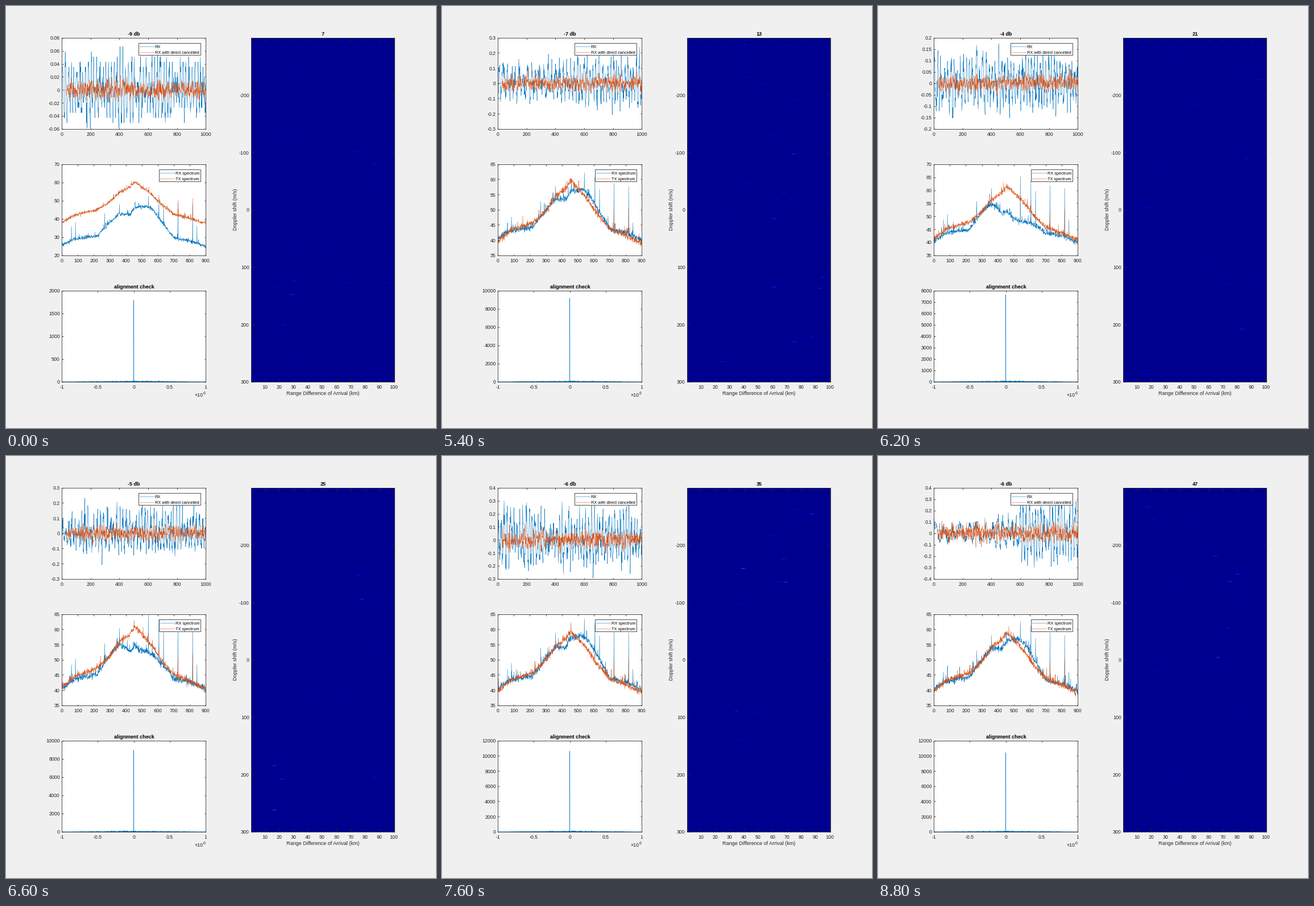
These frames come from a looping animation (756 px wide and 741 px high, 9 s). A matplotlib script:

```python
import numpy as np
import matplotlib.pyplot as plt
from matplotlib.animation import FuncAnimation
from matplotlib.colors import LinearSegmentedColormap
from matplotlib.patches import Rectangle

W, H = 756, 741
DPI = 72  # one point equals one pixel
BLUE, ORANGE, INK = "#0072BD", "#D95319", "#262626"
LINE, FRAME = 0.5, 0.8
HOLD, STEPS, INTERVAL = 25, 20, 200

plt.rcParams.update({
    "font.family": "Liberation Sans", "font.size": 8.7,
    "axes.edgecolor": INK, "axes.linewidth": FRAME,
    "xtick.color": INK, "ytick.color": INK, "text.color": INK,
    "axes.unicode_minus": False,
})

# Key points over the run; everything between them is linear
STEP = [7, 9, 13, 21, 31, 39, 47]
KEYS = {
    "db": [-9, -9, -7, -4, -6, -6, -6],
    "peak": [1790, 4500, 9180, 7650, 10900, 10350, 10430],
    "swing": [.067, .075, .235, .175, .32, .345, .345],
    "attack": [1, 1, .7, .9, .9, 1, .35],
    "rx_floor": [24.8, 29.5, 40, 39.8, 40.5, 39.5, 39.7],
    "rx_crest": [47, 52.7, 56.7, 59.7, 58.8, 57, 57],
    "tx_floor": [37.5, 38, 39, 41, 39.5, 39, 39.2],
    "tx_crest": [60.2, 59.8, 59.5, 61.5, 60, 58.5, 59],
    "dip": [0, 0, 0, 11, 0, 0, 0],
}

# Band shape from floor (0) to crest (1), and tones in dB relative to the crest
BINS = [0, 80, 220, 300, 360, 425, 455, 530, 570, 620, 700, 820, 900]
RX_SHAPE = [.03, .19, .26, .6, .81, .79, .96, 1, .9, .64, .22, .12, 0]
TX_SHAPE = [.02, .2, .33, .52, .75, .88, 1, .8, .67, .47, .23, .1, 0]
RX_TONES = {60: -11, 85: -9, 268: -4, 360: 1, 541: 5.5, 607: 4, 636: 0, 726: 2, 818: 1, 845: -11}
TX_TONES = {268: -12, 607: -7, 726: -10, 818: -9}


def at(name, n):
    return np.interp(n, STEP, KEYS[name])


def nice(lo, hi):
    """Round limits outwards to the finest 1-2-5 step with at most eight intervals."""
    decade = 10.0 ** np.floor(np.log10(hi - lo))
    for step in decade * np.array([.1, .2, .5, 1, 2]):
        a, b = np.floor(lo / step), np.ceil(hi / step)
        if b - a <= 8:
            break
    return np.round(np.arange(a, b + 1) * step, 4) + 0.0


def smooth(x, k):
    return np.convolve(x, np.ones(k) / np.sqrt(k), "same")


def waves(n, rng):
    t = np.arange(1000)
    swing, attack = at("swing", n), at("attack", n)
    env = np.interp(t, [0, 350, 700], [attack, attack, 1])
    phase = np.cumsum(2 * np.pi * env / 20)
    knots = np.arange(0, 1001, 25)
    fade = np.interp(t, knots, rng.uniform(.3, 1, knots.size))
    drift = np.interp(t, knots, rng.normal(0, .9, knots.size))
    rx = env * (fade * np.sin(phase + drift) + .25 * smooth(rng.normal(size=t.size), 2))
    rx = np.where(rx > 0, rx / rx.max(), -.88 * rx / rx.min()) * swing
    rx = (np.floor(rx * 128) + .5) / 128  # 8-bit receiver steps
    rest = smooth(rng.normal(size=t.size), 2) * .13 * swing * (.5 + .5 * fade)
    rest[:30] = 0
    return rx, rest


def spectrum(kind, n, shape, tones, rng):
    x = np.arange(901)
    floor, crest = at(kind + "_floor", n), at(kind + "_crest", n)
    y = floor + (crest - floor) * np.interp(x, BINS, shape)
    if kind == "rx":
        y -= at("dip", n) * np.exp(-((x - 530) / 110) ** 2)
    y += rng.normal(0, .5, x.size) + rng.uniform(0, 3, x.size) * (rng.random(x.size) < .04)
    for tone, level in tones.items():
        y[tone] = max(y[tone], crest + level)
    return y


def correlation(n, rng):
    peak = at("peak", n)
    y = np.abs(rng.normal(size=LAGS.size)) * (1 - np.abs(LAGS)) * .005 * peak
    y = np.minimum(y, .013 * peak)
    y[LAGS.size // 2] = peak
    return y


def echo_map(rng):
    km = np.arange(1, 101)
    speed = np.arange(-299.5, 300)
    out = np.zeros((speed.size, km.size))
    for _ in range(34):
        r, v = rng.uniform(16, 98), rng.integers(-290, 290) + .5
        level = .1 + .8 * rng.random() ** 3
        spot = np.outer(np.exp(-((speed - v) / .6) ** 2), np.exp(-((km - r) / 1.7) ** 2))
        out = np.maximum(out, level * spot)
    return out


fig = plt.figure(figsize=(W / DPI, H / DPI), dpi=DPI, facecolor="#f0f0f0")


def panel(x0, y0, x1, y1, xlim, xticks, tick):
    # The small offset makes the frame snap to the intended pixels
    ax = fig.add_axes([(x0 + .2) / W, 1 - (y1 + .8) / H, (x1 - x0) / W, (y1 - y0) / H])
    ax.set_xlim(*xlim)
    ax.set_xticks(xticks, [f"{v:g}" for v in xticks])
    ax.tick_params(direction="in", top=True, right=True, length=tick, width=FRAME)
    ax.tick_params(axis="x", pad=5.5)
    ax.tick_params(axis="y", pad=3.5)
    return ax


def set_y(ax, ticks):
    ax.set_yticks(ticks, [f"{v:g}" for v in ticks])
    ax.set_ylim(ticks[0], ticks[-1])


def plot(ax, x, color):
    return ax.plot(x, np.zeros(len(x)), color=color, lw=LINE)[0]


LAGS = np.linspace(-1, 1, 2001)

wave_ax = panel(98, 55, 351, 215, (0, 1000), range(0, 1001, 200), 2.5)
spec_ax = panel(98, 277, 351, 437, (0, 900), range(0, 901, 100), 2.5)
align_ax = panel(98, 499, 351, 659, (-1, 1), [-1, -.5, 0, .5, 1], 2.5)
map_ax = panel(431, 55, 683, 659, (.5, 100.5), range(10, 101, 10), 6)

rx_line = plot(wave_ax, np.arange(1, 1001), BLUE)
rest_line = plot(wave_ax, np.arange(1, 1001), ORANGE)
rx_spec = plot(spec_ax, np.arange(901), BLUE)
tx_spec = plot(spec_ax, np.arange(901), ORANGE)
align_line = plot(align_ax, LAGS, BLUE)
align_line.set_zorder(3)

cmap = LinearSegmentedColormap.from_list("echo", ["#00008f", "#0000ff", "#0090ff"])
image = map_ax.imshow(np.zeros((600, 100)), cmap=cmap, vmin=0, vmax=1, aspect="auto",
                      interpolation="nearest", extent=(.5, 100.5, 300, -300))
map_ax.set_yticks(range(-200, 301, 100))

# Overlay in stage pixels for titles, labels and legends
stage = fig.add_axes([0, 0, 1, 1], zorder=5)
stage.set(xlim=(0, W), ylim=(H, 0))
stage.axis("off")


def label(x, y, s, size=9, ha="center", va="baseline", **kw):
    return stage.text(x, y, s, size=size, ha=ha, va=va, **kw)


def title(x, y, s=""):
    return label(x, y, s, weight="bold", color="black")


def legend(x, y, names):
    stage.add_patch(Rectangle((x, y), 342 - x, 21, fc="white", ec=INK, lw=FRAME))
    for i, (name, color) in enumerate(zip(names, (BLUE, ORANGE))):
        cy = y + 6 + 10 * i
        stage.plot([x + 2, x + 26.5], [cy, cy], color=color, lw=LINE)
        label(x + 28.7, cy + 2.7, name, 7.4, "left", color="black")


legend(233, 64.8, ("RX", "RX with direct cancelled"))
legend(269, 286.8, ("RX spectrum", "TX spectrum"))
db_title = title(225, 51.5)
count_title = title(557.5, 51.5)
title(225, 495.5, "alignment check")
label(557.3, 683, "Range Difference of Arrival (km)")
label(403.5, 357, "Doppler shift (m/s)", rotation=90, va="center")
label(346.5, 685.5, "×10", 8.7, "right")
label(346.8, 681.5, "6", 6.8, "left")


def draw(i):
    n = 7 if i < HOLD else 9 + 2 * (i - HOLD)
    rng = np.random.default_rng(n)
    rx, rest = waves(n, rng)
    rx_band = spectrum("rx", n, RX_SHAPE, RX_TONES, rng)
    tx_band = spectrum("tx", n, TX_SHAPE, TX_TONES, rng)
    rx_line.set_ydata(rx)
    rest_line.set_ydata(rest)
    rx_spec.set_ydata(rx_band)
    tx_spec.set_ydata(tx_band)
    align_line.set_ydata(correlation(n, rng))
    image.set_data(echo_map(rng))
    bands = np.concatenate([rx_band, tx_band])
    set_y(wave_ax, nice(rx.min(), rx.max()))
    set_y(spec_ax, nice(bands.min(), bands.max()))
    set_y(align_ax, nice(0, at("peak", n)))
    db_title.set_text(f"{round(at('db', n))} db")
    count_title.set_text(str(n))
    return []


anim = FuncAnimation(fig, draw, frames=HOLD + STEPS, init_func=lambda: draw(0),
                     interval=INTERVAL, repeat=True, repeat_delay=0)
plt.show()
```
